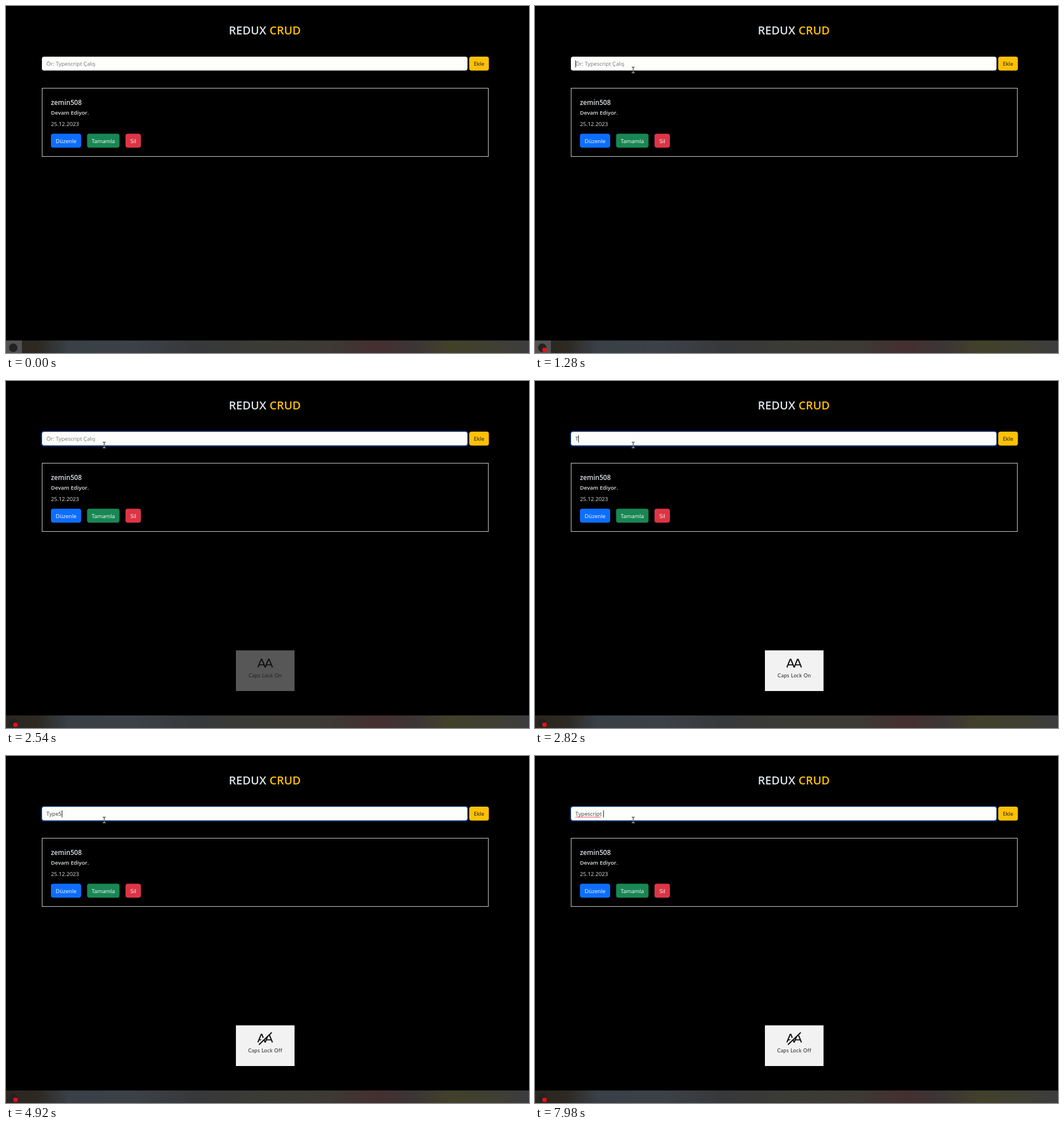
Recreate the animation shown at these times as an HTML page with a canvas. Size 919 by 610 pixels, loop 8 s.

```html
<!DOCTYPE html>
<html lang="tr">
<head>
<meta charset="utf-8">
<title>Redux CRUD</title>
<style>
  html, body { margin: 0; width: 100%; height: 100%; overflow: hidden; background: #000; }
  canvas { display: block; width: 919px; height: 610px; }
</style>
</head>
<body>
<canvas id="stage" width="919" height="610"></canvas>
<script>
const ctx = document.getElementById('stage').getContext('2d');
const LOOP = 8000;
const BLINK = 530;
const SANS = '"Open Sans", "Noto Sans", sans-serif';
const BODY = `9.65px ${SANS}`;
const BOLD = `600 9.6px ${SANS}`;
const LIGHT = '#dee2e6';

// What the field holds from each time on; each edit restarts the caret blink.
const edits = [
  [1230, ''], [1520, ''], [2740, 'T'], [3480, 'Ty'], [3720, 'Typ'], [3960, 'Type'],
  [4560, 'TypeS'], [5500, 'Type'], [6020, 'Types'], [6470, 'Typesc'], [6760, 'Typescr'],
  [7000, 'Typescri'], [7240, 'Typescrip'], [7480, 'Typescript'], [7760, 'Typescript ']
];
const capsToggles = [[2480, true], [3120, false], [4280, true], [4780, false]];

const ramp = (t, a, b) => Math.min(1, Math.max(0, (t - a) / (b - a)));
const ease = k => k * k * (3 - 2 * k);
const latest = (list, t) => list.filter(item => item[0] <= t).pop();

function text(str, x, y, font, color, align = 'left') {
  ctx.font = font;
  ctx.fillStyle = color;
  ctx.textAlign = align;
  ctx.fillText(str, x, y);
}

function box(x, y, w, h, r, color) {
  ctx.fillStyle = color;
  ctx.beginPath();
  ctx.roundRect(x, y, w, h, r);
  ctx.fill();
}

function disc(x, y, r, color) {
  ctx.fillStyle = color;
  ctx.beginPath();
  ctx.arc(x, y, r, 0, 7);
  ctx.fill();
}

function line(points, color, width) {
  ctx.strokeStyle = color;
  ctx.lineWidth = width;
  ctx.beginPath();
  points.forEach(([x, y]) => ctx.lineTo(x, y));
  ctx.stroke();
}

function button(label, x, y, w, color, ink) {
  box(x, y, w, 24.5, 4, color);
  text(label, x + w / 2, y + 16, BODY, ink, 'center');
}

function drawCard() {
  ctx.strokeStyle = '#c9cbc8';
  ctx.lineWidth = 1;
  ctx.strokeRect(63.5, 144.5, 784, 120);
  text('zemin508', 79, 173.5, `600 11.7px ${SANS}`, LIGHT);
  text('Devam Ediyor.', 79, 191, BOLD, LIGHT);
  text('25.12.2023', 79, 210.5, BODY, LIGHT);
  button('Düzenle', 79, 224.5, 53, '#0d6efd', '#fff');
  button('Tamamla', 142.5, 224.5, 57, '#198754', '#fff');
  button('Sil', 210, 224.5, 27, '#dc3545', '#fff');
}

function drawField(t) {
  const focus = ramp(t, 1370, 1520);
  const edit = latest(edits, t);
  const value = edit ? edit[1] : '';
  if (focus) box(60.5, 87, 753, 29, 6, `rgba(13,110,253,${0.25 * focus})`);
  box(63, 89, 748, 24.5, 4, focus > 0.5 ? '#86b7fe' : LIGHT);
  box(63.7, 89.7, 746.6, 23.1, 3.5, '#fdfdfb');

  if (value) text(value, 71, 105, BODY, '#383c40');
  else text('Ör: Typescript Çalış', 71, 105, BODY, '#72767a');

  if (value.endsWith(' ')) {
    const end = 71 + ctx.measureText(value.trim()).width;
    const wave = [];
    for (let x = 71, i = 0; x <= end; x += 1.5, i++) wave.push([x, i % 2 ? 106.5 : 108.3]);
    line(wave, '#e0405a', 0.9);
  }
  if (edit && Math.floor((t - edit[0]) / BLINK) % 2 === 0) {
    ctx.font = BODY;
    const x = Math.round(71 + ctx.measureText(value).width);
    ctx.fillStyle = '#222';
    ctx.fillRect(x, 95.5, 1, 12.5);
  }
}

function letterA(x) {
  line([[x, 503.5], [x + 5.8, 489.3], [x + 7, 489.3], [x + 12.8, 503.5]], '#111', 2);
  line([[x + 2.2, 499], [x + 10.6, 499]], '#111', 1.8);
}

function drawCaps(t) {
  const state = latest(capsToggles, t);
  if (!state) return;
  const on = state[1];
  const fade = 0.36 * ramp(t, 2480, 2540) + 0.64 * ramp(t, 2640, 2760);
  const shade = Math.round(242 * fade);
  ctx.fillStyle = `rgb(${shade},${shade},${shade})`;
  ctx.fillRect(404, 473.5, 103, 71.5);
  letterA(442.6);
  letterA(455.4);
  if (!on) {
    line([[443, 506], [466, 484]], '#f2f2f2', 3);
    line([[444.5, 507.5], [467, 486]], '#111', 2);
  }
  ctx.letterSpacing = '0.35px';
  text(on ? 'Caps Lock On' : 'Caps Lock Off', 455.6, 521, '9px Lato, sans-serif', '#222', 'center');
  ctx.letterSpacing = '0px';
}

function drawTaskbar(t) {
  const bar = ctx.createLinearGradient(0, 0, 919, 0);
  [[0, '#2b2620'], [0.06, '#2d2922'], [0.12, '#394047'], [0.25, '#3c4147'], [0.36, '#37383a'],
   [0.5, '#3b3b35'], [0.62, '#3d3934'], [0.71, '#442f30'], [0.78, '#3b3536'],
   [0.85, '#424129'], [0.94, '#3f3f35'], [1, '#3b3c3f']].forEach(stop => bar.addColorStop(...stop));
  ctx.fillStyle = bar;
  ctx.fillRect(0, 588, 919, 22);
  const active = 1 - ramp(t, 1380, 1520);
  if (active) {
    ctx.fillStyle = `rgba(84,82,80,${active})`;
    ctx.fillRect(0, 588, 28, 22);
  }
  disc(12.7, 600.7, 7.5, '#232123');
  if (t > 500) disc(16.7, 604.3, 3.9, '#f00d16');
}

function drawPointer(t) {
  if (t < 400) return;
  const k = ease(ramp(t, 400, 1080));
  const x = 60 + 112 * k;
  const y = 622 - 509.5 * k;
  if (y < 114) {
    ctx.globalCompositeOperation = 'difference';
    line([[x + 0.5, y - 5], [x + 0.5, y + 5]], '#ddd', 1);
    line([[x - 2, y - 5], [x + 3, y - 5]], '#ddd', 1);
    line([[x - 2, y + 5], [x + 3, y + 5]], '#ddd', 1);
    ctx.globalCompositeOperation = 'source-over';
    return;
  }
  ctx.beginPath();
  [[0, 0], [0, 11], [2.5, 8.7], [4.2, 12.5], [5.8, 11.8], [4.2, 8.1], [7.7, 8]]
    .forEach(([dx, dy]) => ctx.lineTo(x + dx, y + dy));
  ctx.closePath();
  ctx.fillStyle = '#fff';
  ctx.fill();
}

function draw(t) {
  ctx.fillStyle = '#000';
  ctx.fillRect(0, 0, 919, 610);
  const title = `600 20px ${SANS}`;
  text('REDUX', 391.5, 49.5, title, LIGHT);
  text('CRUD', 463, 49.5, title, '#ffc107');
  drawField(t);
  button('Ekle', 814, 89, 34.5, '#ffc107', '#111');
  drawCard();
  drawCaps(t);
  drawTaskbar(t);
  drawPointer(t);
}

function tick() {
  draw(performance.now() % LOOP);
  requestAnimationFrame(tick);
}
tick();
</script>
</body>
</html>
```
